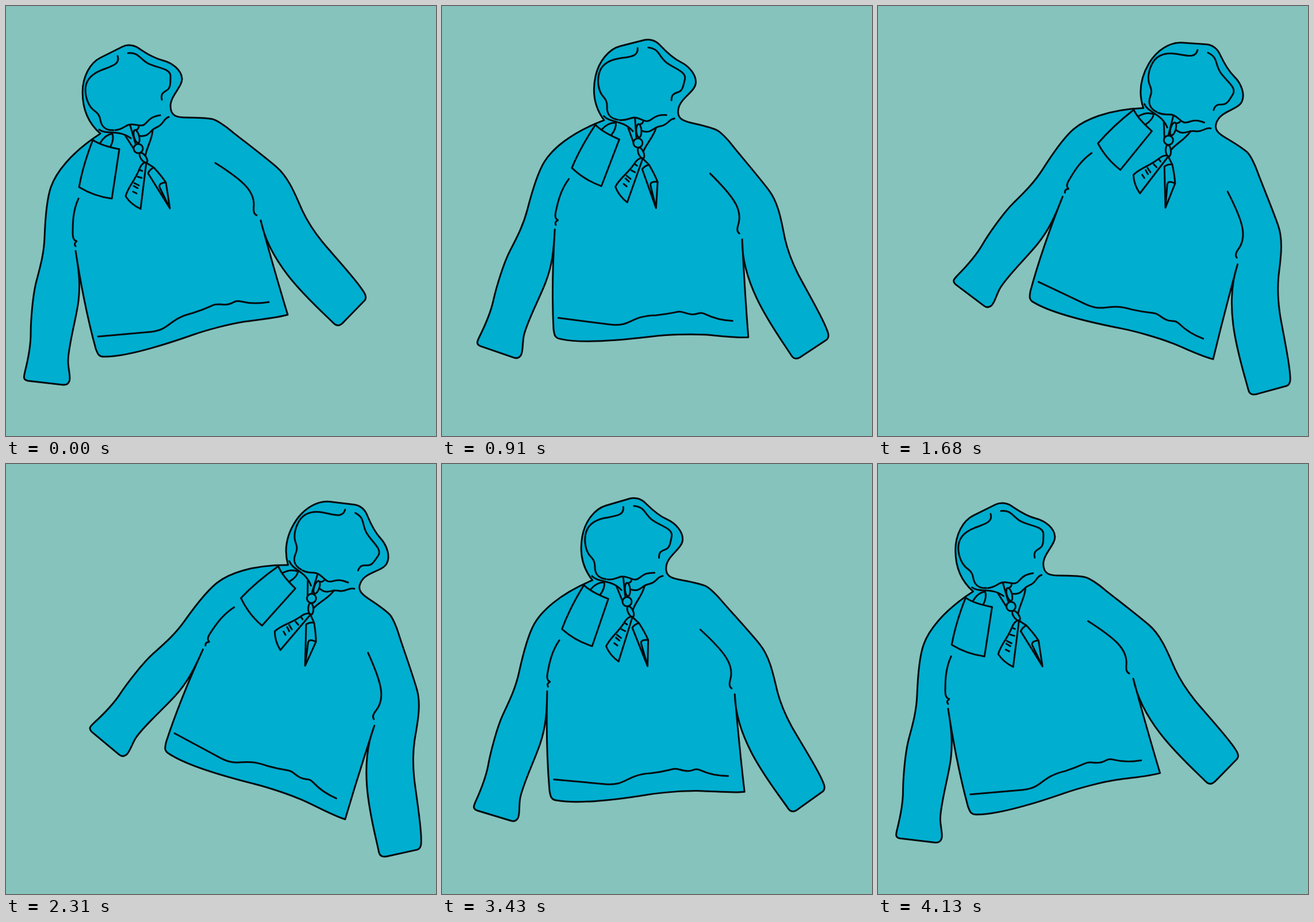
These frames come from a looping animation (748 px wide and 748 px high, 4.2 s). An HTML page:

```html
<!DOCTYPE html>
<html lang="en">
<head>
<meta charset="utf-8">
<title>Swinging hoodie</title>
<style>
  html, body { margin: 0; width: 100%; height: 100%; overflow: hidden; background: #86c3bd; }
  svg { display: block; width: 100vw; height: 100vh; }
  #hoodie { fill: none; stroke: #060a0c; stroke-width: 3; stroke-linecap: round; stroke-linejoin: round; }
  .cloth { fill: #00aed0; }
</style>
</head>
<body>
<svg viewBox="0 0 748 748">
  <g id="hoodie">
    <!-- silhouette: hood, right sleeve, body, left sleeve -->
    <path class="cloth" d="
      M164,222 C142,203 133,177 133,150 S146,99 164,90 S196,74 203,70.5 S221,67 230,73
      S254,90 272,94.5 S305,112 306,126 S286,156 286,174 S298,194 313,194 S350,195 358,196.5
      S382,209 392,217.5 S446,259 470,279.5 S506,336 516,357 S538,395 550,410 S602,468 618,491
      C622,497 629,505 624,512 L588,549 C582,556 576,558 570,552 C535,517 460,455 443,373
      Q466,458 490,537 C470,543 441,545 415,549 S351,563 325,572 S218,610 172,610
      C160,611 159,603 156,596 C141,541 129,478 121,426
      C127,462 130,488 125,520 S107,598 108,620 C109,636 113,647 110,653 Q107,660 99,659
      L38,652 C29,650 31,645 33,636 C39,612 43,590 43,570 S46,504 53,478 S66,430 67,402
      S70,338 78,315 S110,257 164,222 Z"/>

    <!-- hood opening -->
    <path d="M194,87 C199,102 182,105 165,112 S138,130 138,146 S145,174 150,179 S162,186 164,198 S174,217 187,216"/>
    <path d="M212,82 C231,80 232,92 247,100 S286,108 286,122 S286,143 279,147 S269,154 271,163"/>
    <path d="M190,216 C207,214 207,205 220,206 S237,211 244,203 S256,192 268,190"/>

    <!-- neckline -->
    <path d="M162,215 C175,225 196,214 217,230"/>
    <path d="M283,193 C273,196 275,206 262,211 S250,228 233,226"/>
    <path d="M255,215 C255,232 242,250 242,264 M207,225 L223,250 L232,256"/>
    <path d="M216,208 L225,239 M231,209 Q231,215 223,217"/>

    <!-- armpits and hem -->
    <path d="M126,335 C116,357 116,378 116,396 S127,406 121,411 Q118,414 121,418"/>
    <path d="M364,273 C413,304 432,322 431,347 C430,357 431,362 436,364"/>
    <path d="M160,575 L250,567 C288,563 280,545 325,534 C362,522 358,518 372,519 C398,522 393,510 409,514 S440,518 457,515"/>

    <!-- tag -->
    <path d="M164,238 Q172,224 185,222 Q188,232 182,244"/>
    <path class="cloth" d="M151,233 Q165,243 197,249 L184,335 Q153,331 127,315 Q134,276 151,233 Z"/>

    <!-- knot and tails -->
    <ellipse class="cloth" rx="4.5" ry="11.5" transform="translate(227 227) rotate(-15)"/>
    <ellipse class="cloth" rx="4.5" ry="10" transform="translate(239 264) rotate(-35)"/>
    <circle class="cloth" cx="230" cy="248" r="8"/>
    <path d="M244,272 Q236,272 231,286 C222,307 212,315 208,331 Q217,345 234,353 Q240,305 244,272 Z"/>
    <path d="M232,285 l5,2 M229,297 l7,2 M223,308 l8,4 M222,313 l7,4 M221,323 l6,3"/>
    <path d="M246,274 L257,281 Q270,295 278,307 L285,352 L247,291 Q250,284 257,281 M278,307 Q265,308 267,315 L285,352"/>
  </g>
</svg>
<script>
const LOOP = 4200, STEP = 70;
const SWING = 33.9, TRAVEL = 239;
const PIVOT = '287 352';
const RAD = Math.PI / 180;
const hoodie = document.getElementById('hoodie');

// Share of the swing: 0 at the far left, 1 at the far right, slightly slow to leave each end.
function swing(ms) {
  const a = (ms / LOOP * 360 - 2.4) * RAD;
  const lag = (1.6 * Math.sin(2 * a) + 0.5 * Math.sin(a)) * RAD;
  return (1 - Math.cos(a - lag)) / 2;
}

function render(ms) {
  const p = swing(Math.floor(ms % LOOP / STEP) * STEP);
  hoodie.setAttribute('transform', `translate(${TRAVEL * p}) rotate(${SWING * p} ${PIVOT})`);
}

let start;
function tick(now) {
  start ??= now;
  render(now - start);
  requestAnimationFrame(tick);
}
render(0);
requestAnimationFrame(tick);
</script>
</body>
</html>
```
